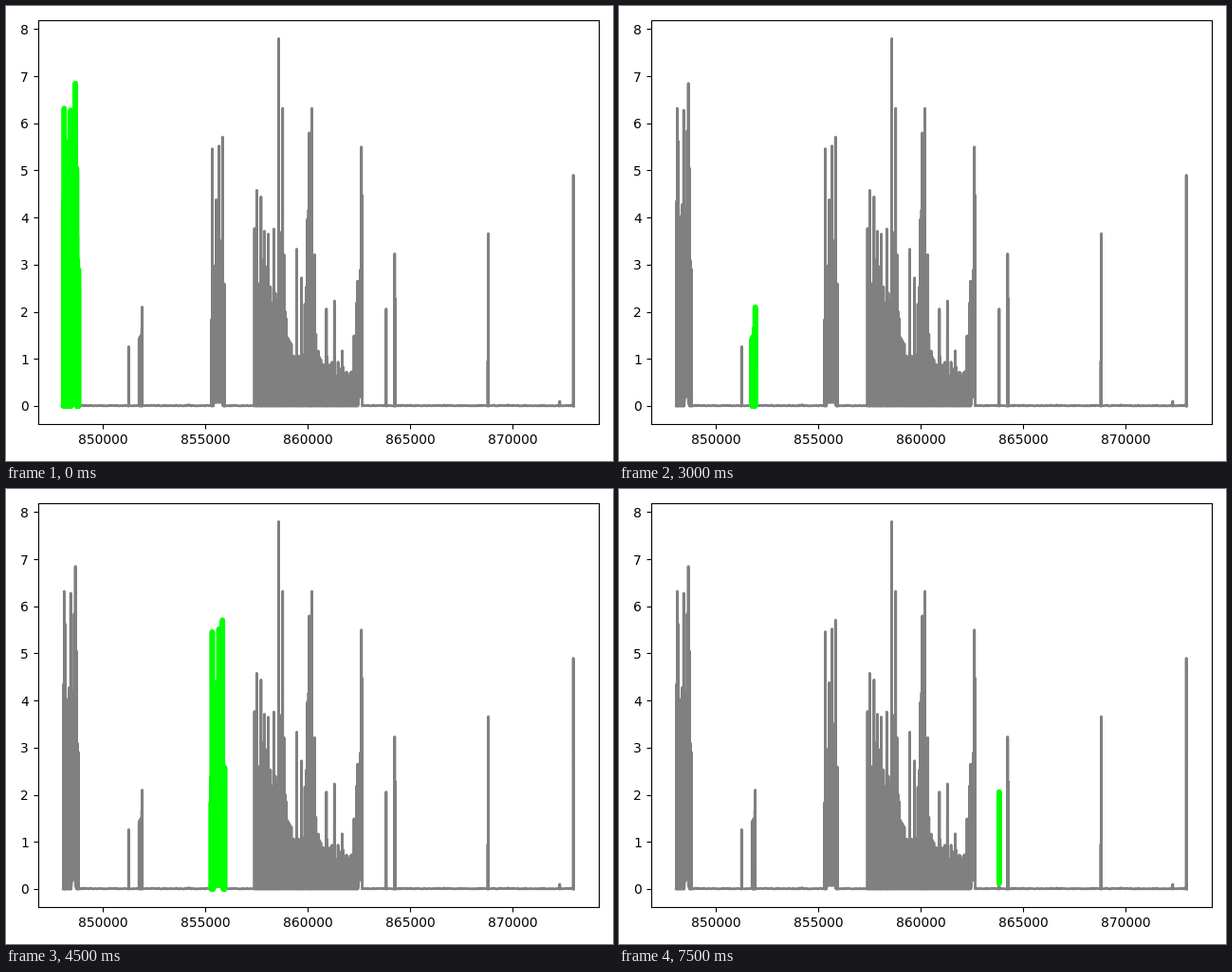
These frames come from a looping animation (640 px wide and 480 px high, 8 s). A matplotlib script:

```python
import matplotlib.pyplot as plt
import numpy as np
from matplotlib.animation import FuncAnimation

T0 = 848000
HOLD = 3            # steps of 500 ms per highlighted event
rng = np.random.default_rng(7)


def spikes(peaks, low=lambda t: 0):
    """Zigzag through (time, height) peaks, returning to low(t) in between."""
    pts = []
    for t, h in peaks:
        pts += [(t - 2, low(t)), (t, h), (t + 2, low(t))]
    return pts


def burst(envelope, peaks, low=lambda t: 0, step=45):
    """Seeded spikes packed under an envelope, with a few taller peaks."""
    ts, hs = zip(*envelope)
    fill = [(t, np.interp(t, ts, hs) * rng.uniform(0.6, 1))
            for t in np.arange(ts[0] + step, ts[-1], step)]
    return spikes(sorted([envelope[0], *fill, envelope[-1], *peaks]), low)


first = [(50, 0)] + burst(
    [(72, 4.35), (700, 4.7), (800, 2.9)],
    [(102, 6.32), (152, 5.62), (420, 6.28), (592, 5.84), (645, 6.85), (705, 5.05)],
    low=lambda t: 0.6 * np.exp(-((t - 560) / 80) ** 4))

blip = spikes([(3247, 1.26)], low=lambda t: 0.22)

pair = burst([(3758, 1.43), (3830, 1.5), (3912, 2.1)], [])

third = burst(
    [(7284, 1.83), (7420, 3.5), (7885, 3.75), (7935, 2.58)],
    [(7332, 5.46), (7530, 4.38), (7660, 5.52), (7832, 5.71)],
    low=lambda t: 0.08 * (7400 < t < 7860))

main = burst(
    [(9395, 3.77), (10520, 2.4), (10690, 5.4), (10960, 1.8), (11780, 0.8),
     (11930, 4.2), (12290, 4.4), (12420, 1.25), (14150, 0.75), (14650, 4.47)],
    [(9504, 4.58), (9713, 4.44), (9884, 3.71), (10070, 3.65), (10338, 3.76),
     (10580, 7.8), (10770, 6.32), (11460, 3.33), (11695, 2.72), (12073, 5.8),
     (12198, 6.32), (12907, 2.06), (13300, 2.23), (13680, 1.17), (14616, 5.5)],
    low=lambda t: 0.2 * (t > 14440), step=60)

late = spikes([(15825, 2.06)], low=lambda t: 0.12)

events = [first, blip, pair, third, main, late]
tail = [spikes([p]) for p in (
    (16240, 3.23), (16262, 2.28), (20790, 0.95), (20812, 3.66),
    (24300, 0.1), (24965, 4.9), (24984, 0.35))]

# Join all events with an almost flat baseline.
signal = []
for event in events + tail:
    if signal:
        flat = np.arange(signal[-1][0] + 2, event[0][0] - 2, 40)
        signal += [(t, abs(rng.normal(0, 0.008))) for t in flat]
        signal.append((event[0][0] - 1, 0))
    signal += event
    signal.append((event[-1][0] + 1, 0))


def xy(points):
    t, y = np.array(points).T
    return t + T0, y


fig, ax = plt.subplots(figsize=(6.4, 4.8), dpi=100)
ax.plot(*xy(signal), color="gray", lw=2)
mark, = ax.plot([], [], color="lime", lw=4, solid_capstyle="round")
ax.set_xlim(846815, 874208)
ax.set_ylim(-0.39, 8.19)
fig.tight_layout()


def update(i):
    mark.set_data(*xy(events[i // HOLD]))
    return mark,


anim = FuncAnimation(fig, update, frames=16, interval=500, repeat=True,
                     repeat_delay=0, init_func=lambda: update(0))
plt.show()
```
